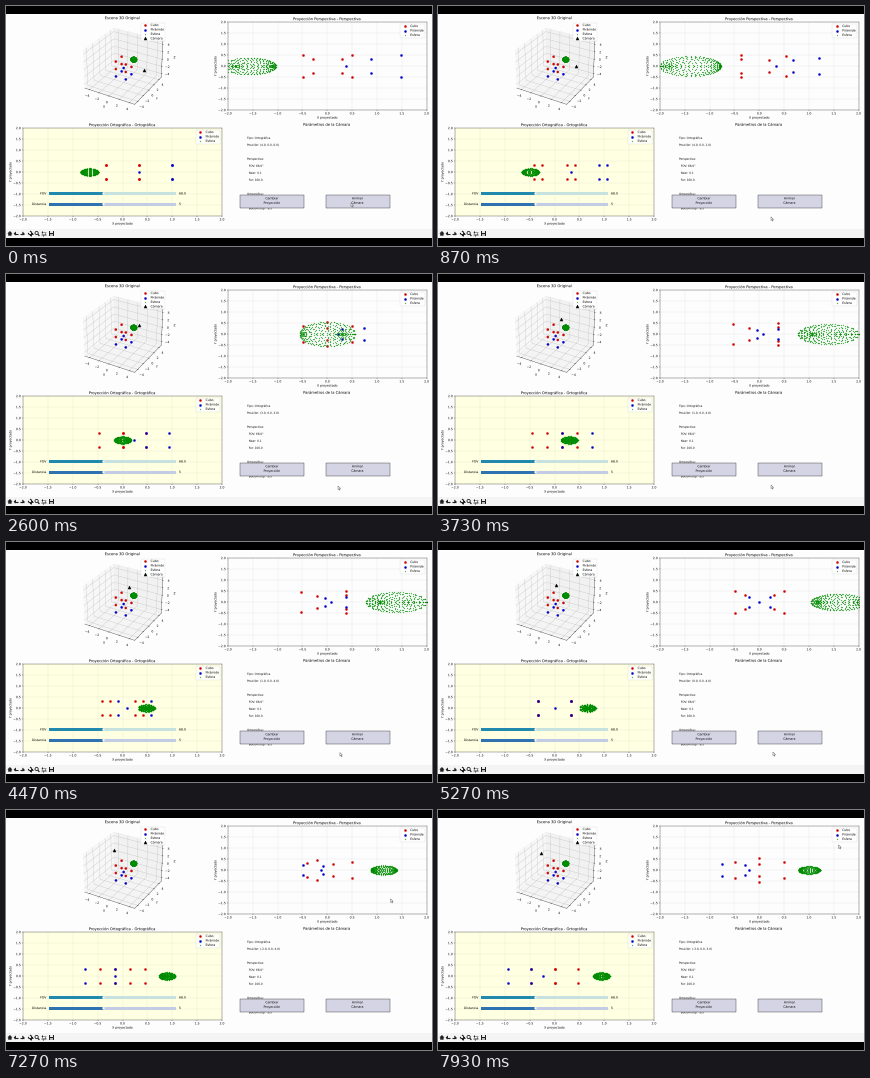
Animation of 426 by 240 pixels, one loop 8000 ms. Source, as a matplotlib script:

```python
import numpy as np
import matplotlib.pyplot as plt
from matplotlib.animation import FuncAnimation
from matplotlib.patches import Circle, Polygon, Rectangle
from matplotlib.patheffects import Normal
from matplotlib.text import Text

W, H = 426, 240
FRAMES, STEP = 125, 64      # 8000 ms
K = W / 1920                # window shrink factor
FOV, HALF = 68.0, 3.0       # view angle, half width of the parallel view

plt.rcParams.update({
    "font.family": "DejaVu Sans", "font.size": 10 * K, "text.hinting": "none",
    "axes.titlesize": 12 * K, "axes.titlepad": 6 * K, "axes.labelpad": 4 * K,
    "axes.linewidth": 0.9 * K, "lines.linewidth": 1.5 * K,
    "grid.linewidth": 0.8 * K, "patch.linewidth": 1 * K,
    "xtick.major.size": 3.5 * K, "ytick.major.size": 3.5 * K,
    "xtick.major.width": 0.9 * K, "ytick.major.width": 0.9 * K,
    "xtick.major.pad": 3.5 * K, "ytick.major.pad": 3.5 * K,
})

# ---------- scene ----------
S = (-1, 1)
cube = np.array([(x, y, z) for x in S for y in S for z in S], float)
pyramid = np.array([(x, y, -3) for x in S for y in S] + [(0, 0, -1)], float)
u, v = np.meshgrid(np.linspace(0, 2 * np.pi, 20), np.linspace(0, np.pi, 20))
sphere = np.column_stack([(2 + 0.5 * np.cos(u) * np.sin(v)).ravel(),
                          (0.5 * np.sin(u) * np.sin(v)).ravel(),
                          (2 + 0.5 * np.cos(v)).ravel()])
# points, colour, marker area, opacity, name
SHAPES = [(cube, "#d00000", 50, 1, "Cubo"),
          (pyramid, "#0000c8", 50, 1, "Pirámide"),
          (sphere, "#008c00", 10, 0.6, "Esfera")]


def camera(ms):
    """Orbit of radius 5 whose coordinates are cut to whole numbers."""
    a = np.radians(3.5 + 16.86 * ms / 1000)
    return int(5 * np.cos(a)), 0, int(5 * np.sin(a))


def view(pts, cam):
    """Right, up and depth of the points seen from the camera."""
    d = np.hypot(cam[0], cam[2])
    c, s = cam[0] / d, cam[2] / d
    x, y, z = pts.T
    return x * s - z * c, y, d - (x * c + z * s)


def perspective(pts, cam):
    h, y, depth = view(pts, cam)
    f = 1 / np.tan(np.radians(FOV / 2))
    return np.column_stack([f * h / depth, f * y / depth])


def parallel(pts, cam):
    h, y, _ = view(pts, cam)
    return np.column_stack([h, y]) / HALF


# ---------- layout ----------
PAPER = "#fdfdfe"
fig = plt.figure(figsize=(W / 100, H / 100), dpi=100, facecolor=PAPER)


def place(x0, y0, x1, y1, **kw):
    return fig.add_axes([x0 / W, 1 - y1 / H, (x1 - x0) / W, (y1 - y0) / H], **kw)


def flat_panel(box, title, face):
    ax = place(*box, facecolor=face)
    ax.set(xlim=(-2, 2), ylim=(-2, 2), title=title,
           xlabel="X proyectado", ylabel="Y proyectado")
    ticks = np.arange(-2, 2.1, 0.5)
    ax.set_xticks(ticks)
    ax.set_yticks(ticks)
    ax.grid(True, alpha=0.5)
    ax.set_axisbelow(True)
    dots = [ax.scatter([], [], c=col, s=size * K * K, alpha=alpha, label=name)
            for _, col, size, alpha, name in SHAPES]
    ax.legend(loc="upper right")
    return dots


ax3 = place(17, 15, 216, 104, projection="3d")
ax3.patch.set_alpha(0)
ax3.set(xlim=(-5, 5), ylim=(-5, 5), zlim=(-5, 5), title="Escena 3D Original",
        xlabel="X", ylabel="Y", zlabel="Z")
for axis in (ax3.xaxis, ax3.yaxis, ax3.zaxis):
    axis.set_ticks(range(-4, 5, 2))
    axis.set_tick_params(pad=11.5 * K - 8)
    axis.labelpad = 25 * K - 21
    axis.line.set_linewidth(0.9 * K)
for pts, col, size, alpha, name in SHAPES:
    ax3.scatter(*pts.T, c=col, s=size * K * K, alpha=alpha, label=name)
cam_dot, = ax3.plot([4], [0], [0], "k^", ms=10 * K, mew=1 * K, ls="none",
                    label="Cámara")
ax3.legend(loc="upper right")

persp = flat_panel((222, 16, 420.6, 104),
                   "Proyección Perspectiva - Perspectiva", PAPER)
ortho = flat_panel((17, 122, 216, 210),
                   "Proyección Ortográfica - Ortográfica", "#ffffe2")

# ---------- window parts, in pixels ----------
top = place(0, 0, W, H, zorder=10)
top.set(xlim=(0, W), ylim=(H, 0))
top.axis("off")


def rect(x0, y0, x1, y1, fill, edge="none", lw=0.0, z=2):
    top.add_patch(Rectangle((x0, y0), x1 - x0, y1 - y0, fc=fill, ec=edge,
                            lw=lw, zorder=z))


def label(x, y, s, ha="left", size=10, z=3):
    return top.text(x, y, s, ha=ha, va="center", fontsize=size * K, zorder=z)


def stroke(xs, ys, col="#222222", lw=0.7):
    top.plot(xs, ys, color=col, lw=lw, zorder=4, solid_capstyle="butt")


rect(0, 0, W, 8, "black")
rect(0, 232, W, H, "black")
rect(0, 222.5, W, 232, "#f4f4f4")

# parameter list, partly covered by the buttons
label(321, 118.7, "Parámetros de la Cámara", "center", 12)
label(241, 132, "Tipo: Ortográfica", size=9, z=1)
pos_text = label(241, 139, "", size=9, z=1)
for y, s in [(153, "Perspectiva:"), (160, "  FOV: 68.0°"), (167, "  Near: 0.1"),
             (174, "  Far: 100.0"), (188, "Ortográfica:"),
             (195, "  Left/Right: -3/3"), (202.5, "  Bottom/Top: -3/3")]:
    label(241, y, s, size=9, z=1)

for x0, a, b in [(234, "Cambiar", "Proyección"), (319.5, "Animar", "Cámara")]:
    rect(x0, 188.5, x0 + 64, 201.5, "#d4d4e4", "#333333", 0.3)
    label(x0 + 32, 192.5, a, "center")
    label(x0 + 32, 197, b, "center")

for y, name, val, fill, rest in [
        (187.6, "FOV", "68.0", "#2189ae", "#c6e2de"),
        (198.2, "Distancia", "5", "#2f72b2", "#c2cce4")]:
    rect(43, y - 1.4, 170, y + 1.4, rest)
    rect(43, y - 1.4, 97, y + 1.4, fill)
    top.add_patch(Circle((97.6, y), 1.2, fc="white", ec="#cccccc", lw=0.2, zorder=4))
    label(40.5, y, name, "right")
    label(173, y, val)

# toolbar icons
Y = 227.5
top.add_patch(Polygon([(1.4, Y), (3.9, Y - 2.5), (6.4, Y), (5.6, Y), (5.6, Y + 2.2),
                       (2.2, Y + 2.2), (2.2, Y)], fc="#222222", lw=0, zorder=4))
for x, d in [(10, 1), (16.3, -1)]:
    stroke([x - 2, x + 2], [Y, Y], lw=0.8)
    top.add_patch(Polygon([(x - 2.4 * d, Y), (x, Y - 2), (x, Y + 2)],
                          fc="#222222", lw=0, zorder=4))
stroke([22, 27], [Y, Y])
stroke([24.5, 24.5], [Y - 2.5, Y + 2.5])
for dx, dy in [(2, 0), (-2, 0), (0, 2), (0, -2)]:
    top.add_patch(Circle((24.5 + dx, Y + dy), 0.7, fc="#222222", lw=0, zorder=4))
top.add_patch(Circle((30.6, Y - 0.5), 1.6, fc="none", ec="#222222", lw=0.6, zorder=4))
stroke([31.8, 33.4], [Y + 0.7, Y + 2.4], lw=0.9)
for dy, knob in [(-1.7, 36.3), (0, 39), (1.7, 37.3)]:
    stroke([35.3, 40.3], [Y + dy, Y + dy], "#555555", 0.4)
    stroke([knob, knob], [Y + dy - 0.7, Y + dy + 0.7])
rect(43.2, Y - 2.4, 48, Y + 2.4, "#222222", z=4)
rect(44.4, Y - 2.4, 46.8, Y - 0.7, "#e8e8e8", z=5)
rect(44.2, Y + 0.5, 47, Y + 2, "#bbbbbb", z=5)

# mouse pointer
ARROW = np.array([(0, 0), (0, 3.6), (0.9, 2.8), (1.6, 4.2), (2.1, 3.9),
                  (1.5, 2.6), (2.6, 2.5)])
pointer = Polygon(ARROW, fc="white", ec="#555555", lw=0.3, zorder=9)
top.add_patch(pointer)
KEYS = [0, 900, 2700, 3700, 5300, 6530, 7930]
PX = [345, 332, 332, 333, 335, 367, 402]
PY = [197, 212, 212, 211, 210, 148, 30]

# small text keeps its even spacing when drawn as outlines
fig.draw_without_rendering()
for t in fig.findobj(Text):
    t.set_path_effects([Normal()])


def update(i):
    t = i * STEP
    # the parallel view is redrawn a little after the others
    lead, lag = camera(t + 30), camera(t - 34)
    cam_dot.set_data_3d(*[[c] for c in lead])
    for dots, project, cam in [(persp, perspective, lead), (ortho, parallel, lag)]:
        for d, shape in zip(dots, SHAPES):
            d.set_offsets(project(shape[0], cam))
    pos_text.set_text("Posición: ({:.1f}, {:.1f}, {:.1f})".format(*lead))
    pointer.set_xy(ARROW + [np.interp(t, KEYS, PX), np.interp(t, KEYS, PY)])
    return []


anim = FuncAnimation(fig, update, frames=FRAMES, interval=STEP, repeat=True,
                     init_func=lambda: update(0), blit=False)
plt.show()
```
